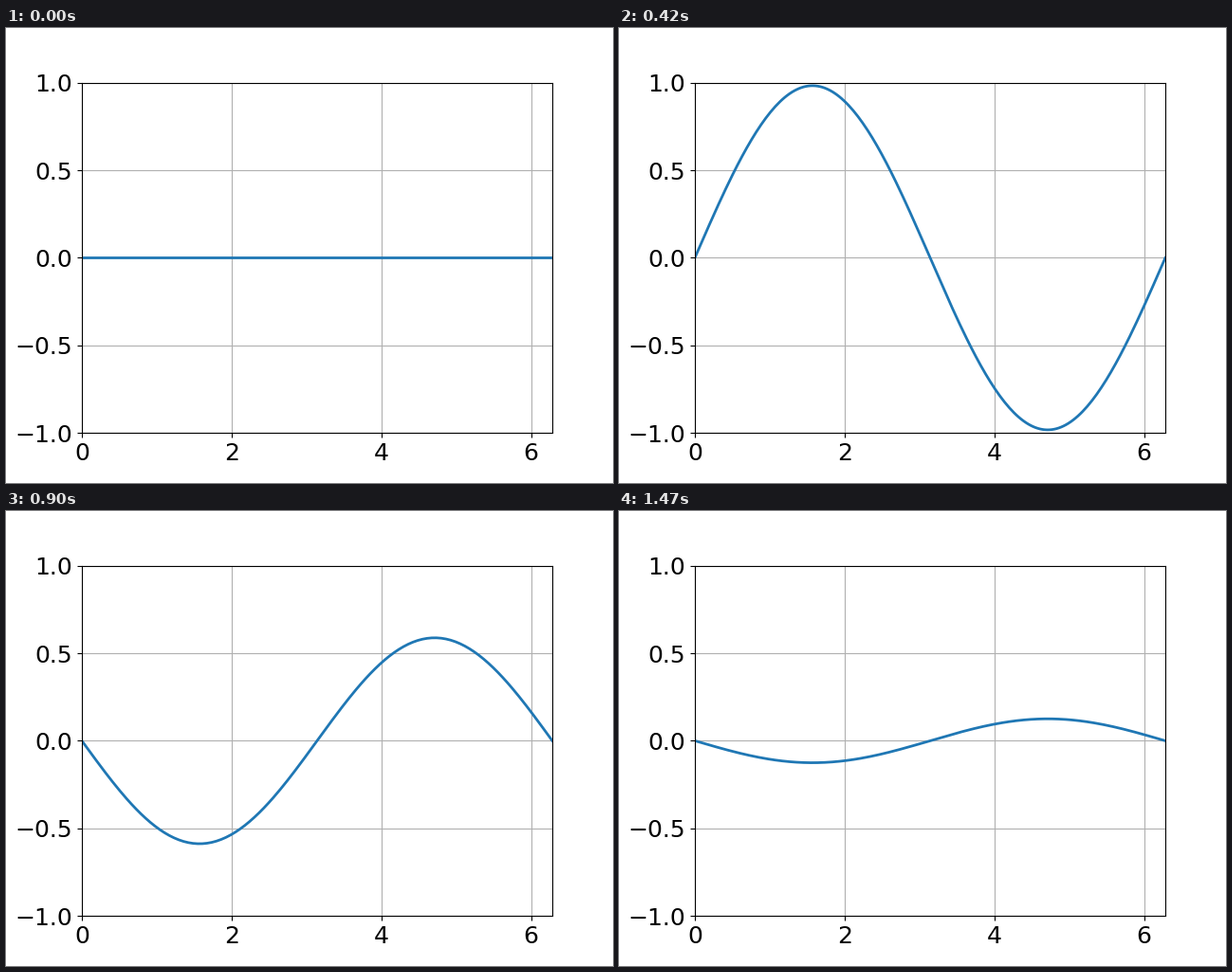
Animation of 640 by 480 pixels, one loop 1500 ms. Source, as a matplotlib script:

```python
import matplotlib.pyplot as plt
import numpy as np
from matplotlib.animation import FuncAnimation

FRAMES = 50
INTERVAL = 30  # ms

plt.rcParams["font.family"] = "DejaVu Sans"
plt.rcParams["font.size"] = 18

fig, ax = plt.subplots(figsize=(6.4, 4.8), dpi=100)
ax.set_xlim(0, 2 * np.pi)
ax.set_ylim(-1, 1)
ax.set_xticks([0, 2, 4, 6])
ax.set_yticks(np.linspace(-1, 1, 5))
ax.grid(True)

x = np.linspace(0, 2 * np.pi, 200)
wave = np.sin(x)
line, = ax.plot(x, np.zeros_like(x), color="tab:blue", lw=2)


def update(i):
    """Standing wave: the amplitude swings through one sine period per loop."""
    line.set_ydata(np.sin(2 * np.pi * i / FRAMES) * wave)
    return line,


anim = FuncAnimation(fig, update, frames=FRAMES, interval=INTERVAL,
                     repeat=True, repeat_delay=0)
plt.show()
```
